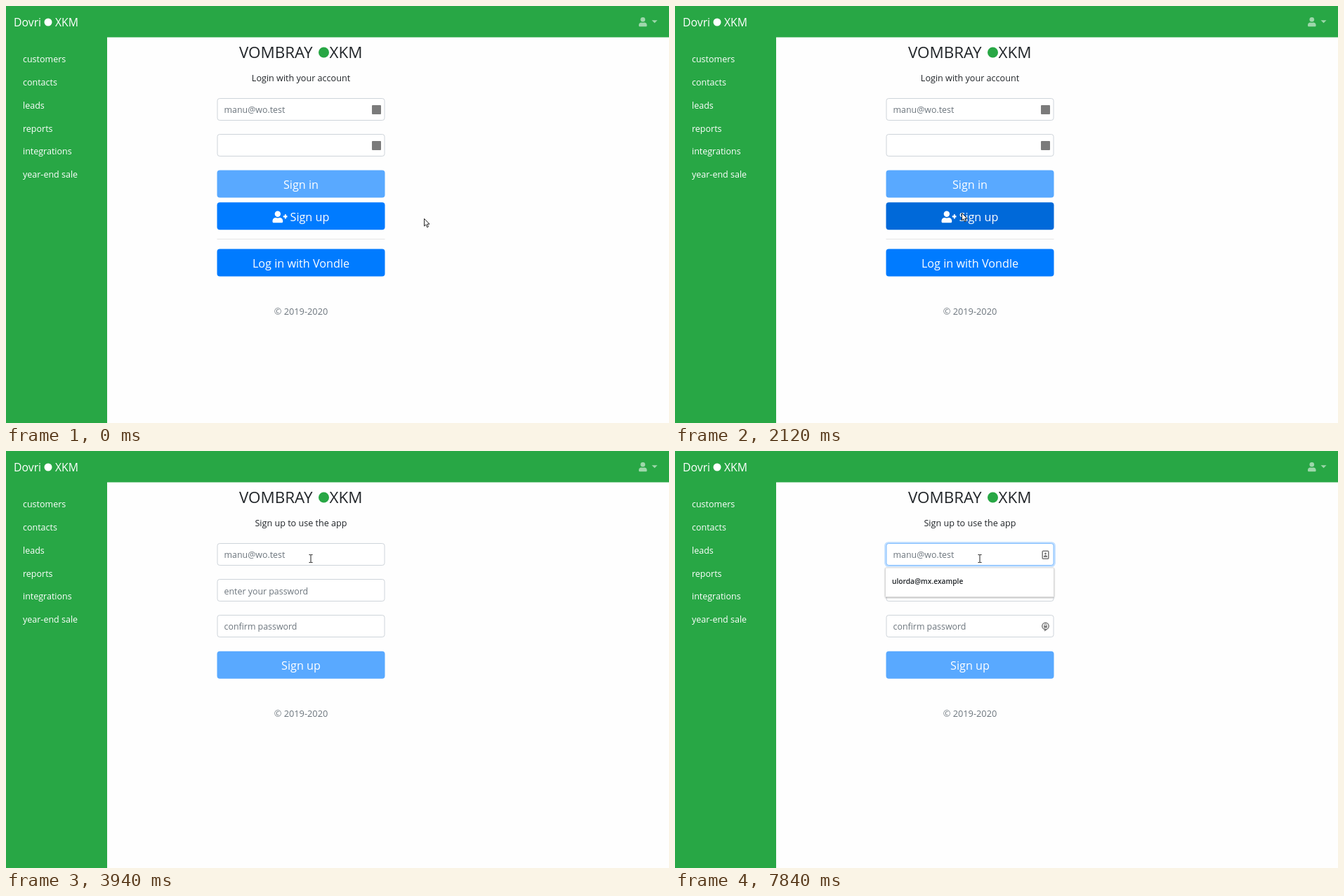
An HTML page for the animation above (8 s loop, 944 by 593 pixels).

```html
<!DOCTYPE html>
<html lang="en">
<head>
<meta charset="utf-8">
<title>Sign up flow</title>
<style>
  html, body { margin: 0; width: 100%; height: 100%; overflow: hidden; background: #fefefe; }
  svg { display: block; width: 944px; height: 593px; }
  text { font: 12.5px "Open Sans", "Noto Sans", sans-serif; fill: #212529; white-space: pre; }
  .mid { text-anchor: middle; font-size: 12.6px; }
  .brand { font-size: 15.8px; fill: #fff; }
  .title { font-size: 22.4px; }
  .nav text { fill: #fff; }
  .label { font-size: 16.2px; fill: #fff; }
  .hint { font-size: 12.4px; fill: #6c757d; }
  .foot { font-size: 12.8px; fill: #6c757d; }
  .suggestion { font-size: 10.2px; font-weight: 600; }
  .field { fill: #fff; stroke: #ced4da; }
  .button { fill: #007bff; }
  .off { fill: #59a9ff; }

  /* One loop is 8 s, so 1% of every timeline is 80 ms. */
  .login, .signup, .press, .popup, .ring, .caret, .arrow, .beam, .register, .badge {
    animation: 8s step-end infinite;
  }
  .login { animation-name: login; }
  .signup { animation-name: signup; }
  .register { animation-name: register; }
  .press { animation-name: press; }
  .badge { animation-name: badge; }
  .popup { animation-name: popup; }
  .ring { animation-name: ring; }
  .caret { animation-name: caret; }
  .arrow { animation-name: arrow; }
  .beam { animation-name: beam; }

  @keyframes login { 0% { visibility: visible } 38.5%, 100% { visibility: hidden } }
  @keyframes signup { 0% { visibility: hidden } 38.5%, 100% { visibility: visible } }
  @keyframes register {
    0% { fill: #007bff } 26.5% { fill: #0069d9 } 36.875%, 100% { fill: #0062cc }
  }
  @keyframes press {
    0% { visibility: hidden } 36.875% { visibility: visible } 38.5%, 100% { visibility: hidden }
  }
  @keyframes badge { 0% { fill: #7b7b7b } 23.125% { fill: #606060 } 24.875%, 100% { fill: #7b7b7b } }
  @keyframes popup { 0% { visibility: hidden } 50.875%, 100% { visibility: visible } }
  @keyframes ring { 0% { visibility: hidden } 52.625%, 100% { visibility: visible } }
  @keyframes caret {
    0%, 57.375%, 70.25%, 83.875%, 98%, 100% { visibility: hidden }
    50.875%, 64%, 77.25%, 90.5% { visibility: visible }
  }
  @keyframes arrow {
    0% { transform: translate(595px, 302px); visibility: visible }
    14% { transform: translate(594px, 300px); visibility: visible }
    16% { transform: translate(578px, 258px); visibility: visible }
    17.75% { transform: translate(546px, 118px); visibility: visible }
    19.75% { transform: translate(515px, 73px); visibility: visible }
    21.375% { transform: translate(449px, 110px); visibility: visible }
    23.125% { transform: translate(404px, 214px); visibility: hidden }
    24.875% { transform: translate(403px, 281px); visibility: visible }
    26.5% { transform: translate(408px, 294px); visibility: visible }
    28.375% { transform: translate(415px, 297px); visibility: visible }
    44% { transform: translate(408px, 245px); visibility: hidden }
    45.625% { transform: translate(414px, 175px); visibility: visible }
    47.5% { transform: translate(421px, 165px); visibility: visible }
    49.25%, 100% { transform: translate(434px, 153px); visibility: hidden }
  }
  @keyframes beam {
    0% { transform: translate(404px, 214px); visibility: hidden }
    23.125% { transform: translate(404px, 214px); visibility: visible }
    24.875% { transform: translate(408px, 245px); visibility: hidden }
    44% { transform: translate(408px, 245px); visibility: visible }
    45.625% { transform: translate(434px, 153px); visibility: hidden }
    49.25%, 100% { transform: translate(434px, 153px); visibility: visible }
  }
</style>
</head>
<body>
<svg viewBox="0 0 944 593">
  <defs>
    <g id="person">
      <circle cx="224" cy="128" r="128"/>
      <path d="M314 288h-17c-46 21-100 21-146 0h-17C60 288 0 348 0 422v42c0 26 21 48 48 48h352c26 0 48-21 48-48v-42c0-74-60-134-134-134z"/>
    </g>
    <rect id="field" x="301" y=".5" width="238" height="31" rx="3.3"/>
    <rect id="button" x="300.5" width="239" height="39" rx="4"/>
    <filter id="shadow" x="-5%" y="-10%" width="110%" height="130%">
      <feDropShadow dx="0" dy="1" stdDeviation="1" flood-color="#000" flood-opacity=".3"/>
    </filter>
  </defs>

  <rect width="944" height="593" fill="#fefefe"/>
  <path d="M0 0H944V44.5H144V593H0z" fill="#28a745"/>

  <text class="brand" x="11" y="29">Dovri</text>
  <circle cx="60" cy="23" r="5.5" fill="#fff"/>
  <text class="brand" x="70" y="29">XKM</text>
  <g fill="#fff" opacity=".55">
    <use href="#person" transform="translate(901 16) scale(.0258)"/>
    <path d="M919.5 20.3h8l-4 4z"/>
  </g>

  <g class="nav">
    <text x="24" y="80">customers</text>
    <text x="24" y="113">contacts</text>
    <text x="24" y="146">leads</text>
    <text x="24" y="179">reports</text>
    <text x="24" y="211">integrations</text>
    <text x="24" y="244">year-end sale</text>
  </g>

  <text class="title" x="332" y="74">VOMBRAY</text>
  <circle cx="452.5" cy="66" r="7.5" fill="#28a745"/>
  <text class="title" x="460.5" y="74">XKM</text>

  <g class="login">
    <text class="mid" x="420" y="107">Login with your account</text>
    <use class="field" href="#field" y="131"/>
    <text class="hint" x="310.5" y="152">manu@wo.test</text>
    <rect x="521" y="141" width="13" height="13" rx="1" fill="#7b7b7b"/>
    <use class="field" href="#field" y="182"/>
    <rect class="badge" x="521" y="192" width="13" height="13" rx="1"/>

    <use class="off" href="#button" y="233.5"/>
    <text class="mid label" x="420" y="260">Sign in</text>

    <rect class="press" x="298" y="276.5" width="244" height="44" rx="6" fill="#93c7ff"/>
    <use class="register" href="#button" y="279.2"/>
    <g fill="#fff" transform="translate(379.5 291.5) scale(.0328)">
      <use href="#person"/>
      <path d="M528 144h64v64h48v64h-48v64h-64v-64h-64v-64h64z"/>
    </g>
    <text class="label" x="404.5" y="306">Sign up</text>

    <path d="M300.5 331.5h239" stroke="#e5e5e5"/>
    <use class="button" href="#button" y="345.5"/>
    <text class="mid label" x="420" y="372">Log in with Vondle</text>
    <text class="mid foot" x="420" y="439">© 2019-2020</text>
  </g>

  <g class="signup">
    <text class="mid" x="420" y="107">Sign up to use the app</text>
    <use class="field" href="#field" y="131"/>
    <g class="ring">
      <rect x="298.2" y="129.2" width="243.6" height="35.6" rx="5.5" fill="#bfdeff"/>
      <rect x="301" y="131.5" width="238" height="31" rx="3.3" fill="#fff" stroke="#80bdff"/>
    </g>
    <text class="hint" x="310.5" y="152">manu@wo.test</text>
    <use class="field" href="#field" y="182"/>
    <text class="hint" x="310.5" y="204">enter your password</text>
    <use class="field" href="#field" y="233"/>
    <text class="hint" x="310.5" y="254">confirm password</text>
    <use class="off" href="#button" y="284.7"/>
    <text class="mid label" x="420" y="311">Sign up</text>
    <text class="mid foot" x="420" y="378">© 2019-2020</text>
  </g>

  <g class="popup">
    <g fill="none" stroke="#777" stroke-width="1.5">
      <rect x="523.2" y="142.2" width="8.6" height="11" rx="1"/>
      <circle cx="527.5" cy="249" r="4.7"/>
      <path d="M526 249v-1.5a1.5 1.5 0 0 1 3 0v1.5" stroke-width="1"/>
    </g>
    <g fill="#777">
      <circle cx="527.5" cy="146" r="1.4"/>
      <path d="M525 151v-1.5q2.5-3 5 0v1.5zM525.2 248.6h4.6v3h-4.6zM526 252l3.5 2.2-3.5 2.3z"/>
    </g>
    <rect x="299.5" y="166" width="240" height="41.5" rx="1" fill="#fff" stroke="#d2d2d2" stroke-width=".8" filter="url(#shadow)"/>
    <text class="suggestion" x="309" y="189">ulorda@mx.example</text>
  </g>
  <rect class="caret" x="311" y="138" width="1" height="18" fill="#222"/>

  <path class="arrow" d="M.5.5V11l2.4-2.2 1.7 3.9 1.8-.8-1.7-3.8H8z" fill="#fff" stroke="#111" stroke-width=".9"/>
  <path class="beam" d="M-2.5-5.5h2l.5.5.5-.5h2M0-5V5M-2.5 5.5h2L0 5l.5.5h2" fill="none" stroke="#222"/>
</svg>
</body>
</html>
```
